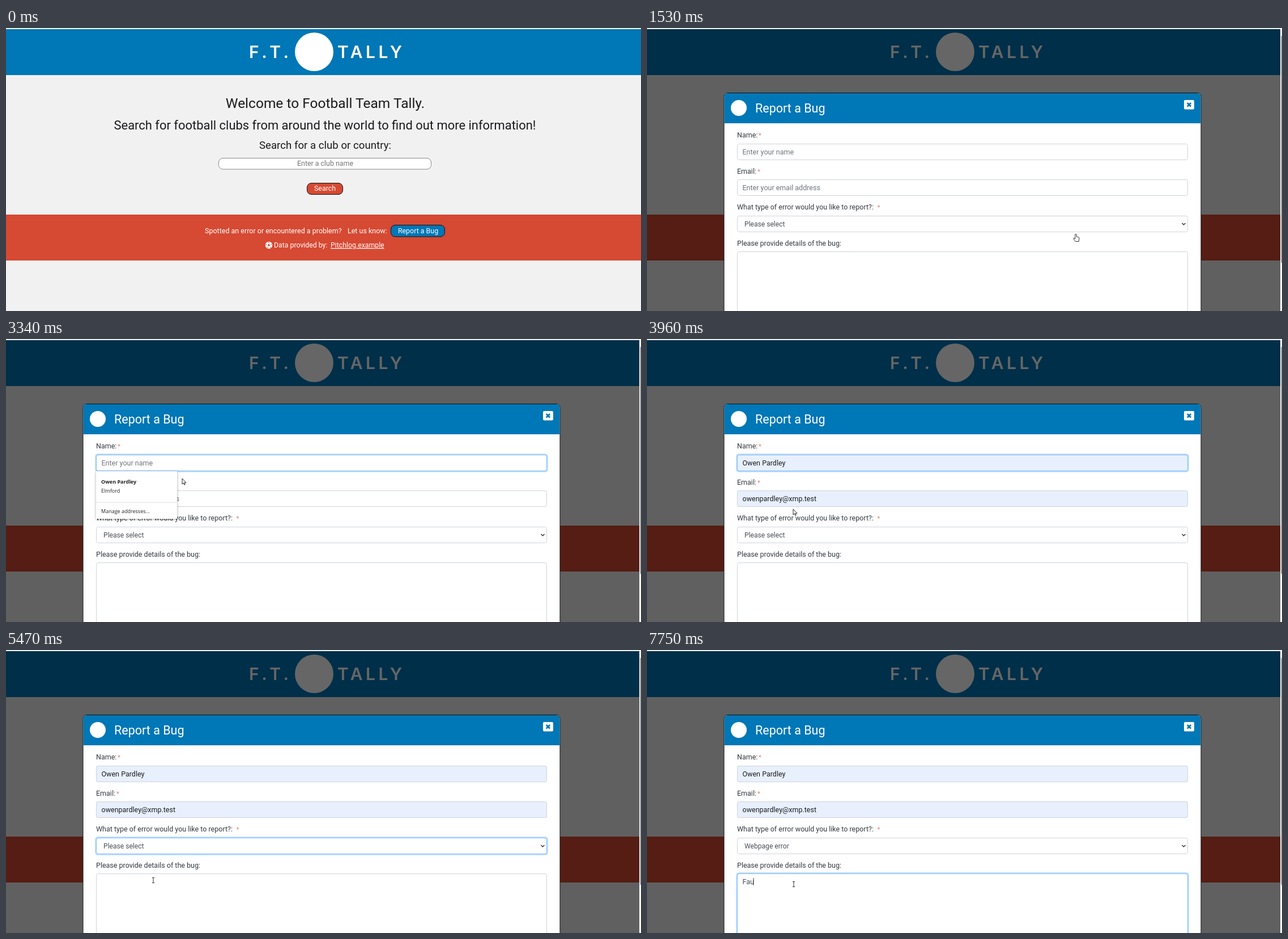
Write an HTML page that moves like this. It is 1121x499 px and loops after 8 s.

```html
<!DOCTYPE html>
<html lang="en">
<head>
<meta charset="utf-8">
<title>Report a Bug</title>
<style>
html, body { margin: 0; width: 100%; height: 100%; overflow: hidden; background: #f1f1f1; }
svg { display: block; font-family: Roboto, sans-serif; }
.mid { text-anchor: middle; }
.brand { font: 600 30px Inter, sans-serif; letter-spacing: 5.5px; }
.system { font-family: "Open Sans", sans-serif; }
.bold { font-weight: 700; }
.link { text-decoration: underline; }
.raised { filter: drop-shadow(0 6px 7px rgba(0, 0, 0, .8)); }
.popup { filter: drop-shadow(0 1px 2px rgba(0, 0, 0, .35)); }
</style>
</head>
<body>
<svg id="stage" width="1121" height="499"></svg>
<script>
const LOOP = 8000;
const BLUE = '#0077b6', RED = '#d64933', INK = '#1b1b1e', BODY = '#343a40', MUTED = '#6c757d', FILLED = '#e8f0fe';

const text = (x, y, size, str, fill = INK, cls = '') =>
  `<text x="${x}" y="${y}" font-size="${size}" fill="${fill}" class="${cls}">${str}</text>`;
const rect = (x, y, w, h, fill, attrs = '') =>
  `<rect x="${x}" y="${y}" width="${w}" height="${h}" fill="${fill}" ${attrs}/>`;
const circle = (x, y, r, fill) => `<circle cx="${x}" cy="${y}" r="${r}" fill="${fill}"/>`;
// Visible from one time up to another
const during = (from, to, ...parts) => `<g data-from="${from}" data-to="${to}">${parts.join('')}</g>`;
const field = (y, h, fill = '#fff') => rect(159.5, y + .5, 795, h, fill, 'rx="3" stroke="#ced4da"');
const glow = (id, y, h) =>
  `<g id="${id}">${rect(158.5, y - .5, 797, h + 2, 'none', 'rx="4" stroke="#bfdeff" stroke-width="3"')}` +
  `${rect(159.5, y + .5, 795, h, 'none', 'rx="3" stroke="#80bdff"')}</g>`;
const label = (y, str, starX) =>
  text(159, y, 12.5, str, BODY) + (starX ? text(starX, y, 11.5, '*', '#de8070') : '');
const caret = x => rect(x, 402, 1, 13, '#333');

function ball(x, y) {
  const spots = [0, 1, 2, 3, 4].map(i => {
    const a = (i * 72 - 90) * Math.PI / 180;
    return [Math.cos(a), Math.sin(a)];
  });
  const points = spots.map(([c, s]) => [x + 2.2 * c, y + 2.2 * s]).join(' ');
  return circle(x, y, 6.2, '#fff') + `<polygon points="${points}" fill="${RED}"/>` +
    spots.map(([c, s]) => circle(x + 4.7 * c, y + 4.7 * s, .9, RED)).join('');
}

const page = [
  rect(0, 0, 1121, 499, '#f1f1f1'),
  rect(0, 2, 1121, 81, BLUE),
  text(429, 53, 30, 'F.T.', '#fff', 'brand'),
  circle(544, 42, 34, '#fff'),
  text(585, 53, 30, 'TALLY', '#fff', 'brand'),
  text(563.5, 140.5, 24.5, 'Welcome to Football Team Tally.', INK, 'mid'),
  text(563, 178.5, 21.95, 'Search for football clubs from around the world to find out more information!', INK, 'mid'),
  text(563.5, 212.5, 18.67, 'Search for a club or country:', INK, 'mid'),
  rect(375.5, 229.5, 375, 19.5, '#fff', 'rx="7.5" stroke="#8a8a8a"'),
  text(563.5, 242.5, 12.4, 'Enter a club name', '#757575', 'mid'),
  rect(531.5, 273.5, 63, 20, RED, 'rx="7.5" stroke="#111"'),
  text(563, 287, 12.4, 'Search', '#fff', 'mid'),
  rect(0, 329, 1121, 81, RED),
  text(351, 361.5, 12.5, 'Spotted an error or encountered a problem?', '#fff'),
  text(603, 361.5, 12.5, 'Let us know:', '#fff'),
  `<g id="raise">${rect(679, 347, 96, 21, '#111', 'rx="7.5" class="raised"')}</g>`,
  rect(679.5, 347.5, 95, 20.5, BLUE, 'rx="7.5" stroke="#111"'),
  during(1360, LOOP,
    rect(679.5, 346.5, 96, 22, BLUE, 'rx="3" stroke="#fff"'),
    rect(681, 348, 93, 19, 'none', 'rx="2" stroke="#101010" stroke-width="2"')),
  text(727.5, 361.5, 12.4, 'Report a Bug', '#fff', 'mid'),
  ball(464, 383),
  text(473, 387, 12.3, 'Data provided by:', '#fff'),
  text(573, 387, 12.3, 'Pitchlog.example', '#fff', 'link')
];

const form = [
  rect(0, 2, 1118, 497, '#000', 'opacity=".6"'),
  rect(1118, 0, 3, 499, '#fafafa'),
  rect(1119.5, 14, 1.5, 400, '#8a8a8a'),
  rect(136, 114.5, 842, 400, '#fff', 'rx="6" stroke="#111"'),
  `<path d="M136.5 168V121Q136.5 115 142.5 115H971.5Q977.5 115 977.5 121V168Z" fill="${BLUE}"/>`,
  circle(162, 141, 14, '#fff'),
  text(191, 149, 21.5, 'Report a Bug', '#fff'),
  rect(948, 127, 18, 16.5, '#fff', 'rx="2"'),
  `<path d="M953.8 132l6.4 6.4m0-6.4l-6.4 6.4" stroke="${BLUE}" stroke-width="2.8"/>`,

  label(193, 'Name:', 197),
  field(204, 28),
  during(0, 3420, text(168.5, 222.5, 12.5, 'Enter your name', MUTED)),
  label(256.5, 'Email:', 195),
  field(267, 28),
  during(0, 3420, text(168.5, 286, 12.5, 'Enter your email address', MUTED)),
  during(3420, LOOP,
    field(204, 28, FILLED), text(168.5, 222.5, 12.5, 'Owen Pardley'),
    field(267, 28, FILLED), text(168.5, 286, 12.5, 'owenpardley@xmp.test')),
  glow('nameGlow', 204, 28),
  during(2470, 2870, rect(168, 211, 1, 13, '#333')),

  label(320, 'What type of error would you like to report?:', 406.5),
  field(331, 28),
  glow('typeGlow', 331, 28),
  during(0, 5540, text(172, 349.5, 12.1, 'Please select', '#495057')),
  during(5540, LOOP, text(172, 349.5, 12.1, 'Webpage error', '#495057')),
  '<path d="M944.5 344l3 3 3-3" fill="none" stroke="#343a40" stroke-width="1.5"/>',

  label(384, 'Please provide details of the bug:'),
  field(394, 200),
  glow('detailGlow', 394, 200),
  '<text id="typed" x="168.5" y="413" font-size="12.5" fill="#495057"></text>',
  during(6160, 6640, caret(168.5)),
  during(7190, 7260, caret(168.5)),
  during(7260, 7430, caret(175)),
  during(7430, 7750, caret(181.5)),
  during(7750, LOOP, caret(187.5)),

  during(2620, 3640,
    rect(159, 233, 143, 84, '#fff', 'class="popup"'),
    during(3420, 3640, rect(159, 237, 143, 46, '#eee')),
    text(168, 255, 9, 'Owen Pardley', '#222', 'system bold'),
    text(168, 270.5, 9, 'Elmford', '#222', 'system'),
    rect(159, 287.5, 143, 1, '#ddd'),
    text(168, 307, 9, 'Manage addresses...', '#222', 'system')),

  during(4500, 5390,
    rect(160, 359.5, 794.5, 50, '#fff', 'stroke="#777" class="popup"'),
    rect(160.5, 360, 793.5, 16.5, '#c8c8c8', 'id="option"'),
    text(172, 371.5, 12.1, 'Please select', '#858585'),
    text(172, 388, 12.1, 'Club data error', '#495057'),
    text(172, 404.5, 12.1, 'Webpage error', '#495057'))
];

const shapes = {
  arrow: '<path d="M0 0V10L2.3 7.9 3.8 11.2 5.3 10.5 3.9 7.3H7Z" fill="#fff" stroke="#111" stroke-width=".9"/>',
  hand: '<path d="M-1.2 1Q0-1 1.2 1V5L5 5.8Q6.2 6.2 6 8L5.2 13.5H-.5L-3.8 9Q-4.3 7.3-2.8 7.4L-1.2 8.7Z" fill="#fff" stroke="#222" stroke-width=".9"/>',
  beam: '<path d="M-2-4.5H2M0-4.5V4.5M-2 4.5H2" fill="none" stroke="#333"/>'
};

// time, x, y, shape
const moves = [
  [0, -50, -50, 'arrow'],
  [470, 1109, 488, 'arrow'], [540, 950, 430, 'arrow'], [610, 797, 383, 'arrow'],
  [840, 788, 375, 'arrow'], [920, 772, 367, 'hand'], [1000, 764, 365, 'hand'], [1070, 759, 364, 'hand'], [1130, 757, 363, 'hand'],
  [1830, 690, 340, 'arrow'], [1920, 600, 305, 'arrow'], [2000, 535, 281, 'beam'],
  [2250, 515, 252, 'arrow'], [2330, 498, 220, 'beam'],
  [2870, 450, 223, 'beam'], [2950, 390, 236, 'arrow'], [3030, 335, 242, 'arrow'], [3110, 314, 244, 'arrow'],
  [3340, 311, 246, 'arrow'], [3420, 265, 253, 'arrow'], [3490, 240, 260, 'arrow'],
  [3810, 246, 276, 'beam'], [3900, 258, 300, 'arrow'], [3980, 270, 322, 'arrow'], [4070, 282, 337, 'arrow'], [4150, 288, 346, 'arrow'],
  [4670, 283, 355, 'arrow'], [4760, 278, 366, 'arrow'], [4840, 273, 372, 'arrow'], [4900, 269, 382, 'arrow'],
  [4980, 264, 394, 'arrow'], [5060, 261, 400, 'arrow'], [5140, 260, 404, 'arrow'],
  [5470, 260, 406, 'beam'], [5850, 259.5, 410, 'beam'], [5930, 259, 413, 'beam']
];
const hovers = [[0, 0], [4900, 1], [4980, 2]];
const typing = [[0, ''], [7260, 'F'], [7430, 'Fa'], [7750, 'Fau']];

const stage = document.getElementById('stage');
stage.innerHTML = page.join('') + during(1530, LOOP, ...form) + '<g id="cursor"></g>';
const el = id => document.getElementById(id);
const timed = [...stage.querySelectorAll('[data-from]')];

const latest = (list, t) => list.findLast(entry => entry[0] <= t);
const ramp = (t, from, length = 150) => Math.min(1, Math.max(0, (t - from) / length));
const fade = (id, value) => el(id).setAttribute('opacity', value);

function draw() {
  const t = performance.now() % LOOP;
  for (const g of timed) {
    g.style.display = t >= +g.dataset.from && t < +g.dataset.to ? '' : 'none';
  }
  fade('raise', ramp(t, 920));
  fade('nameGlow', ramp(t, 2400) - ramp(t, 4410));
  fade('typeGlow', ramp(t, 4410) - ramp(t, 6010));
  fade('detailGlow', ramp(t, 6010));
  el('option').setAttribute('y', 360 + 16.5 * latest(hovers, t)[1]);
  el('typed').textContent = latest(typing, t)[1];
  const [, x, y, shape] = latest(moves, t);
  el('cursor').innerHTML = shapes[shape];
  el('cursor').setAttribute('transform', `translate(${x} ${y})`);
  requestAnimationFrame(draw);
}
draw();
</script>
</body>
</html>
```
